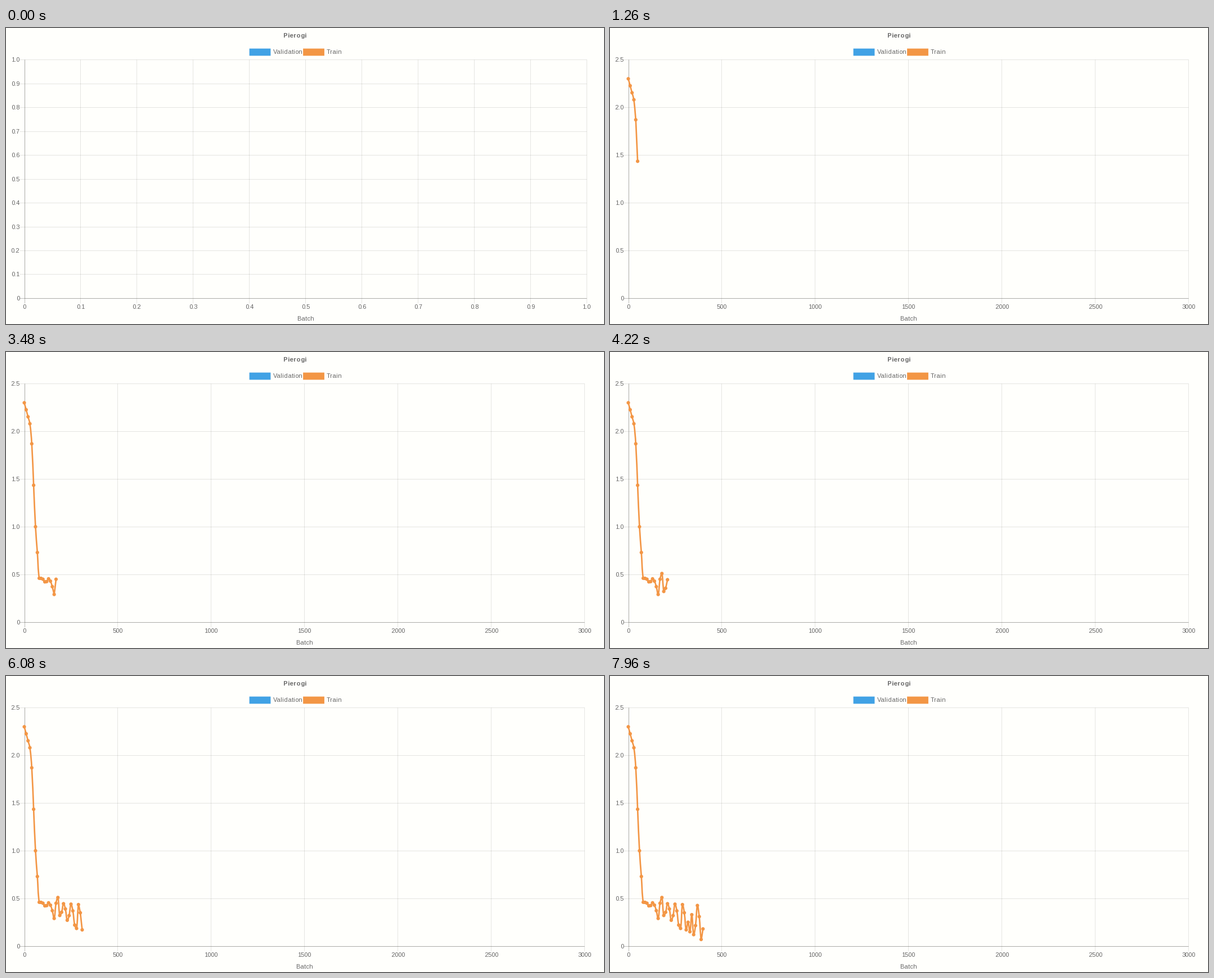
Recreate the animation shown at these times as a matplotlib script. Size 1063 by 527 pixels, loop 8000 ms.

```python
import numpy as np
import matplotlib.pyplot as plt
from matplotlib.animation import FuncAnimation
from matplotlib.collections import LineCollection
from matplotlib.patches import PathPatch, Rectangle
from matplotlib.path import Path

W, H, DPI = 1063, 527, 64
PT = 72 / DPI                       # points per pixel
STEP, LOOP = 20, 8000               # ms
ZOOM = 0.886                        # browser zoom of the chart
LEFT, RIGHT, TOP, BOTTOM = 32.51, 1028.4, 56.42, 480.92
BLUE, ORANGE, GREY = "#41a2e5", "#f39645", "#666666"
TENSION, EASE_MS = 0.4, 1000
COUNT = 41

plt.rcParams["font.family"] = "Liberation Sans"
plt.rcParams["text.hinting"] = "force_autohint"
plt.rcParams["text.hinting_factor"] = 1

fig = plt.figure(figsize=(W / DPI, H / DPI), dpi=DPI, facecolor="#fffffc")
ax = fig.add_axes([0, 0, 1, 1])
ax.set_xlim(0, W)
ax.set_ylim(H, 0)
ax.axis("off")


def label(x, y, s, ha="center", weight="normal"):
    return ax.text(x, y, s, ha=ha, va="baseline", color=GREY, weight=weight,
                   size=11 * PT, parse_math=False)


def rules(segments, alpha):
    return ax.add_collection(LineCollection(
        segments, colors=[(0, 0, 0, alpha)], linewidths=PT, zorder=1))


def scales(right, xlabels, ylabels):
    """Grid, tick labels and axis title for one pair of scales."""
    xs = np.linspace(LEFT, right, len(xlabels))
    ys = np.linspace(BOTTOM, TOP, len(ylabels))
    tick = 10 * ZOOM
    cols = [[(x, TOP), (x, BOTTOM + tick)] for x in xs]
    rows = [[(LEFT - tick, y), (right, y)] for y in ys]
    edges = [[(LEFT, TOP), (LEFT, BOTTOM)], [(LEFT, BOTTOM), (right, BOTTOM)]]
    parts = [rules(cols[1:] + rows[1:], 0.1),
             rules([cols[0], rows[0]], 0.25),
             rules(edges, 0.1)]
    parts += [label(x, 500, s) for x, s in zip(xs, xlabels)]
    parts += [label(LEFT - tick + 0.7, y + 4, s, "right")
              for y, s in zip(ys, ylabels)]
    parts.append(label((LEFT + right) / 2, 521, "Batch"))
    return parts


def key(x, color, name):
    ax.add_patch(Rectangle((x, 36.6), 37.8, 12.8, color=color, lw=0,
                           snap=False))
    label(x + 42, 46, name, "left")


label(514, 17, "Pierogi", weight="bold")
key(432.6, BLUE, "Validation")
key(528.1, ORANGE, "Train")

tenths = ["0"] + [f"{v / 10:.1f}" for v in range(1, 11)]
halves = ["0"] + [f"{v / 2:.1f}" for v in range(1, 6)]
empty = scales(1032.4, tenths, tenths)
filled = scales(RIGHT, [str(v) for v in range(0, 3001, 500)], halves)

curve = ax.add_patch(PathPatch(Path([(0, 0)]), fc="none", ec=ORANGE,
                               lw=3 * ZOOM * PT, capstyle="butt",
                               joinstyle="miter", zorder=3))
dots = ax.add_patch(PathPatch(Path([(0, 0)]), fc=ORANGE, lw=0, zorder=4))


def losses(k):
    """Steep drop, then a slow decline with a widening wave and a few jolts."""
    trend = np.interp(k, [0, 3, 4, 6, 8, 40],
                      [2.30, 2.08, 1.87, 1.00, 0.46, 0.24])
    wave = 0.006 * np.maximum(k - 8, 0) * np.cos(np.pi / 2 * (k - 1.2))
    jolts = np.zeros(len(k))
    jolts[[16, 18, 28, 33]] = -0.1, 0.1, -0.1, -0.28
    return trend + wave + jolts


index = np.arange(COUNT)
arrive = 332 + 181 * index + 0.12 * index ** 2      # slowing down slightly
pts = np.column_stack([LEFT + (RIGHT - LEFT) * index / 300,
                       BOTTOM - (BOTTOM - TOP) * losses(index) / 2.5])
circle = Path.unit_circle()


def handles(prev, cur, nxt):
    """Incoming and outgoing spline handles of one point."""
    a, b = np.hypot(*(cur - prev)), np.hypot(*(nxt - cur))
    share = a / (a + b) if a + b else 0
    reach = TENSION * (nxt - prev)
    back, ahead = cur - share * reach, cur + (1 - share) * reach
    return np.clip([back, ahead], (LEFT, TOP), (RIGHT, BOTTOM))


def unsettled(k, t, count):
    """Part of the handle change still to come; each arrival restarts it."""
    marks = np.append(arrive[k + 1:count], t)
    spans = np.minimum(np.diff(marks) / EASE_MS, 1)
    return np.prod((1 - spans) ** 4)


def spline(t, count):
    hs = []
    for k in range(count):
        prev, cur = pts[max(k - 1, 0)], pts[k]
        h = handles(prev, cur, cur)
        if k < count - 1:
            goal = handles(prev, cur, pts[k + 1])
            h = goal + (h - goal) * unsettled(k, t, count)
        hs.append(h)
    verts, codes = [pts[0]], [Path.MOVETO]
    for k in range(1, count):
        verts += [hs[k - 1][1], hs[k][0], pts[k]]
        codes += [Path.CURVE4] * 3
    return Path(verts, codes)


def discs(count):
    shape = circle.vertices * 3.5 * ZOOM
    verts = (pts[:count, None] + shape).reshape(-1, 2)
    return Path(verts, np.tile(circle.codes, count))


def draw(i):
    t = i * STEP
    count = int(np.sum(arrive <= t))
    for part in empty:
        part.set_visible(count == 0)
    for part in filled:
        part.set_visible(count > 0)
    curve.set_visible(count > 1)
    dots.set_visible(count > 0)
    if count:
        curve.set_path(spline(t, count))
        dots.set_path(discs(count))
    return [curve, dots, *empty, *filled]


anim = FuncAnimation(fig, draw, frames=LOOP // STEP, interval=STEP,
                     init_func=lambda: draw(0), repeat=True, repeat_delay=0)
plt.show()
```
